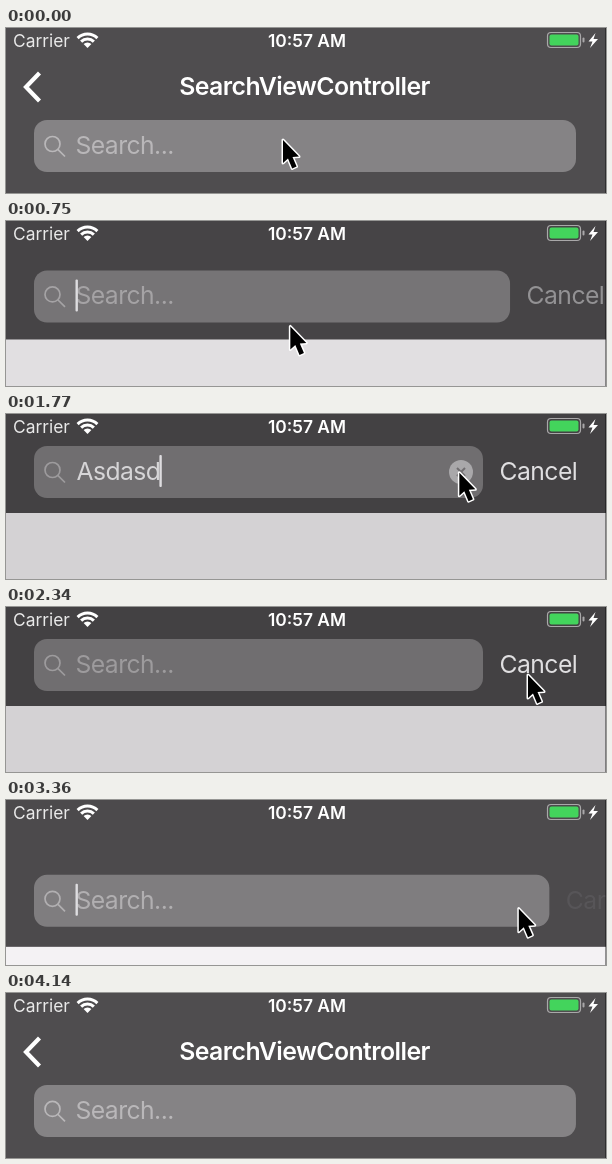
An HTML page with a canvas that plays this animation: 600x165 px, repeating every 4.44 s.

```html
<!DOCTYPE html>
<html lang="en">
<head>
<meta charset="utf-8">
<title>Search bar</title>
<style>
html, body { margin: 0; width: 100%; height: 100%; overflow: hidden; background: #4f4d4f; }
canvas { display: block; width: 600px; height: 165px; }
</style>
</head>
<body>
<canvas id="stage" width="600" height="165"></canvas>
<script>
const ctx = document.getElementById('stage').getContext('2d');
const LOOP = 4440, SLIDE = 300;
const FONT = 'Inter, "Liberation Sans", sans-serif';
const TYPED = 'Asdasd', TYPE_START = 1140, KEY_GAP = 75;

// the bar opens and closes in turn at these times
const [OPEN, CLOSE, REOPEN, RECLOSE] = [558, 2340, 3255, 3845];

// pointer glides: leave time, arrival time, then the tip's new place
const GLIDES = [
  [640, 1180, 344, 44], [1200, 2190, 522, 68], [2640, 2850, 522, 77],
  [2880, 3090, 512, 112], [3300, 3720, 526, 54], [3860, 4135, 560, 180]
];

const mix = (a, b, p) => a + (b - a) * p;

function grey(a, b, p) {
  const v = Math.round(mix(a, b, p));
  return `rgb(${v}, ${v - 2}, ${v})`;
}

function ease(t, from, to) {
  const p = Math.min(1, Math.max(0, (t - from) / (to - from)));
  return p * p * (3 - 2 * p);
}

const slide = (t, from) => ease(t, from, from + SLIDE);
const openness = t => slide(t, OPEN) - slide(t, CLOSE) + slide(t, REOPEN) - slide(t, RECLOSE);

function text(str, x, y, color, size = 24.7, weight = 400, align = 'left') {
  ctx.font = `${weight} ${size}px ${FONT}`;
  ctx.letterSpacing = size > 20 ? '-0.55px' : '0px';
  ctx.textAlign = align;
  ctx.fillStyle = color;
  ctx.fillText(str, x, y);
  return ctx.measureText(str).width;
}

function trace(points, x = 0, y = 0) {
  ctx.beginPath();
  for (const [px, py] of points) ctx.lineTo(x + px, y + py);
}

function fill(color) {
  ctx.fillStyle = color;
  ctx.fill();
}

function stroke(color, width) {
  ctx.strokeStyle = color;
  ctx.lineWidth = width;
  ctx.stroke();
}

function box(x, y, w, h, r) {
  ctx.beginPath();
  ctx.roundRect(x, y, w, h, r);
}

function statusBar() {
  text('Carrier', 7, 19, '#e9e9e9', 17.4);
  text('10:57 AM', 301, 19, '#fff', 17.4, 600, 'center');

  for (const [r, width] of [[14, 3], [9, 3], [2.75, 5.5]]) {
    ctx.beginPath();
    ctx.arc(81.5, 20, r, -Math.PI * 0.75, -Math.PI * 0.25);
    stroke('#fff', width);
  }

  box(541.5, 4.5, 33, 15, 3.5);
  stroke('#a9a8a9', 1.2);
  box(543.5, 6.5, 29, 11, 2);
  fill('#43d45c');
  box(576.5, 9.5, 2, 5, 1);
  fill('#a9a8a9');
  trace([[589.5, 5], [582.5, 13.5], [586.5, 13.5], [584, 20], [592, 11], [587.5, 11]]);
  fill('#fff');
}

function titleRow(p) {
  const dy = -80 * p;
  ctx.globalAlpha = Math.max(0, 1 - 3.5 * p);
  text('SearchViewController', 298.5, 67 + dy, '#fff', 24.8, 600, 'center');
  trace([[33.5, 45], [20, 59], [33.5, 73]], 0, dy);
  stroke('#fff', 4.2);
  ctx.globalAlpha = 1;
}

function clearButton(x, y, markColor) {
  ctx.beginPath();
  ctx.arc(x, y, 12, 0, 7);
  fill('#a9a8aa');
  for (const s of [1, -1]) {
    trace([[-4, -4 * s], [4, 4 * s]], x, y);
    stroke(markColor, 2);
  }
}

function searchField(t, p) {
  const top = mix(92, 32, p), right = mix(570, 477, p);
  const mid = top + 26, base = top + 34;
  const back = grey(133, 112, p), hint = grey(185, 157, p);
  box(28, top, right - 28, 52, 13);
  fill(back);

  ctx.beginPath();
  ctx.arc(46.5, mid - 2, 7.5, 0, 7);
  ctx.moveTo(51.8, mid + 3.3);
  ctx.lineTo(59, mid + 10.5);
  stroke(hint, 1.7);

  const typed = t >= TYPE_START && t < CLOSE
    ? TYPED.slice(0, 1 + Math.floor((t - TYPE_START) / KEY_GAP)) : '';
  let caret = 69.5;
  if (typed) {
    caret += text(typed, 70.5, base, '#d6d5d7');
    clearButton(455, mid, back);
  } else {
    text('Search...', 69.5, base, hint);
  }
  if ((t > OPEN + 80 && t < 2080) || (t > REOPEN + 80 && t < RECLOSE)) {
    box(caret, top + 9, 2.4, 32, 1);
    fill('#dedde0');
  }

  ctx.globalAlpha = p * p;
  text('Cancel', right + 16.5, base, '#e0dfe1');
  ctx.globalAlpha = 1;
}

function pointer(t) {
  let x = 277, y = 112 + ease(t, 0, 180);
  for (const [from, to, nextX, nextY] of GLIDES) {
    const p = ease(t, from, to);
    x = mix(x, nextX, p);
    y = mix(y, nextY, p);
  }
  trace([[0, 0], [0, 23], [5, 18.5], [9.2, 28.5], [13.6, 26.5], [9.5, 17], [16, 16.5]], x, y);
  ctx.closePath();
  ctx.lineJoin = 'round';
  stroke('#fff', 3);
  ctx.lineJoin = 'miter';
  fill('#000');
}

function draw(t) {
  const p = openness(t);
  ctx.fillStyle = grey(257, 212, p);
  ctx.fillRect(0, 0, 600, 165);
  ctx.fillStyle = grey(79, 67, p);
  ctx.fillRect(0, 0, 600, mix(166, 99, p));
  titleRow(p);
  searchField(t, p);
  statusBar();
  ctx.fillStyle = 'rgba(0, 0, 0, 0.4)';
  ctx.fillRect(599, 0, 1, 165);
  pointer(t);
}

const start = performance.now();
function tick() {
  draw((performance.now() - start) % LOOP);
  requestAnimationFrame(tick);
}
tick();
</script>
</body>
</html>
```
